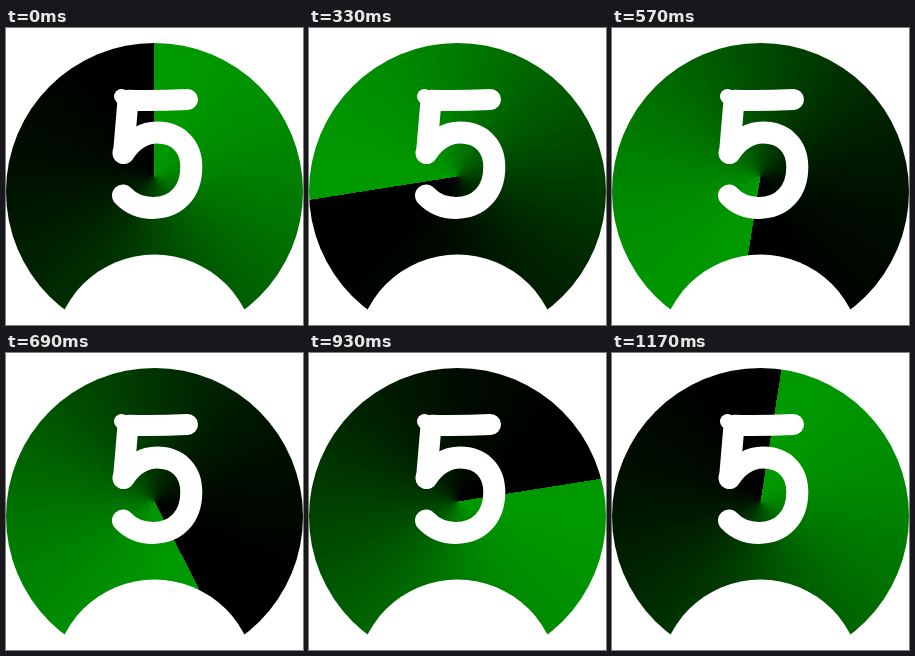
An HTML page with a canvas for the animation above (1200 ms loop, 297 by 297 pixels).

```html
<!DOCTYPE html>
<html lang="en">
<head>
<meta charset="utf-8">
<title>Sweep</title>
<style>
html, body { margin: 0; width: 100%; height: 100%; overflow: hidden; background: #fff; }
canvas { display: block; width: 297px; height: 297px; }
</style>
</head>
<body>
<canvas id="stage" width="297" height="297"></canvas>
<script>
const ctx = document.getElementById('stage').getContext('2d');
const LOOP = 1200, STEP = 30, STEPS = LOOP / STEP;
const TAU = Math.PI * 2, PEAK = 153, SHADES = 48;

// Disc with a round bite taken out of its lower edge
const disc = new Path2D();
disc.arc(148.5, 163.5, 148.5, 0, TAU);
const bite = new Path2D();
bite.arc(148.5, 327.5, 101, 0, TAU);

// The digit: flag and stem, bowl, and a small knob at the corner
const arm = new Path2D('M181.5 71.5Q150 73 122 72.3L117.5 125.5');
const bowl = new Path2D(
  'M117.5 125C127 111 138 104.6 151 104.6' +
  'C172 104.6 185.3 118 185.3 139C185.3 164 170 179.9 147 179.9' +
  'C133 179.9 124 175 117 167.5'
);
const knob = new Path2D();
knob.arc(115.5, 68.5, 7.5, 0, TAU);

function sweep(angle) {
  const g = ctx.createConicGradient(angle, 148.5, 148.5);
  for (let i = 0; i <= SHADES; i++) {
    const t = i / SHADES;
    const fade = ((1 + Math.cos(Math.PI * t)) / 2) ** 1.15;
    g.addColorStop(t, `rgb(0,${Math.round(PEAK * fade)},0)`);
  }
  return g;
}

function line(path, width) {
  ctx.lineWidth = width;
  ctx.stroke(path);
}

function draw(step) {
  ctx.fillStyle = '#fff';
  ctx.fillRect(0, 0, 297, 297);
  ctx.fillStyle = sweep(-TAU / 4 - TAU * step / STEPS);
  ctx.fill(disc);

  ctx.fillStyle = ctx.strokeStyle = '#fff';
  ctx.lineCap = ctx.lineJoin = 'round';
  ctx.fill(bite);
  line(arm, 21);
  line(bowl, 22);
  ctx.fill(knob);
}

let start = null;
function tick(now) {
  if (start === null) start = now;
  draw(Math.floor(((now - start) % LOOP) / STEP));
  requestAnimationFrame(tick);
}
draw(0);
requestAnimationFrame(tick);
</script>
</body>
</html>
```
